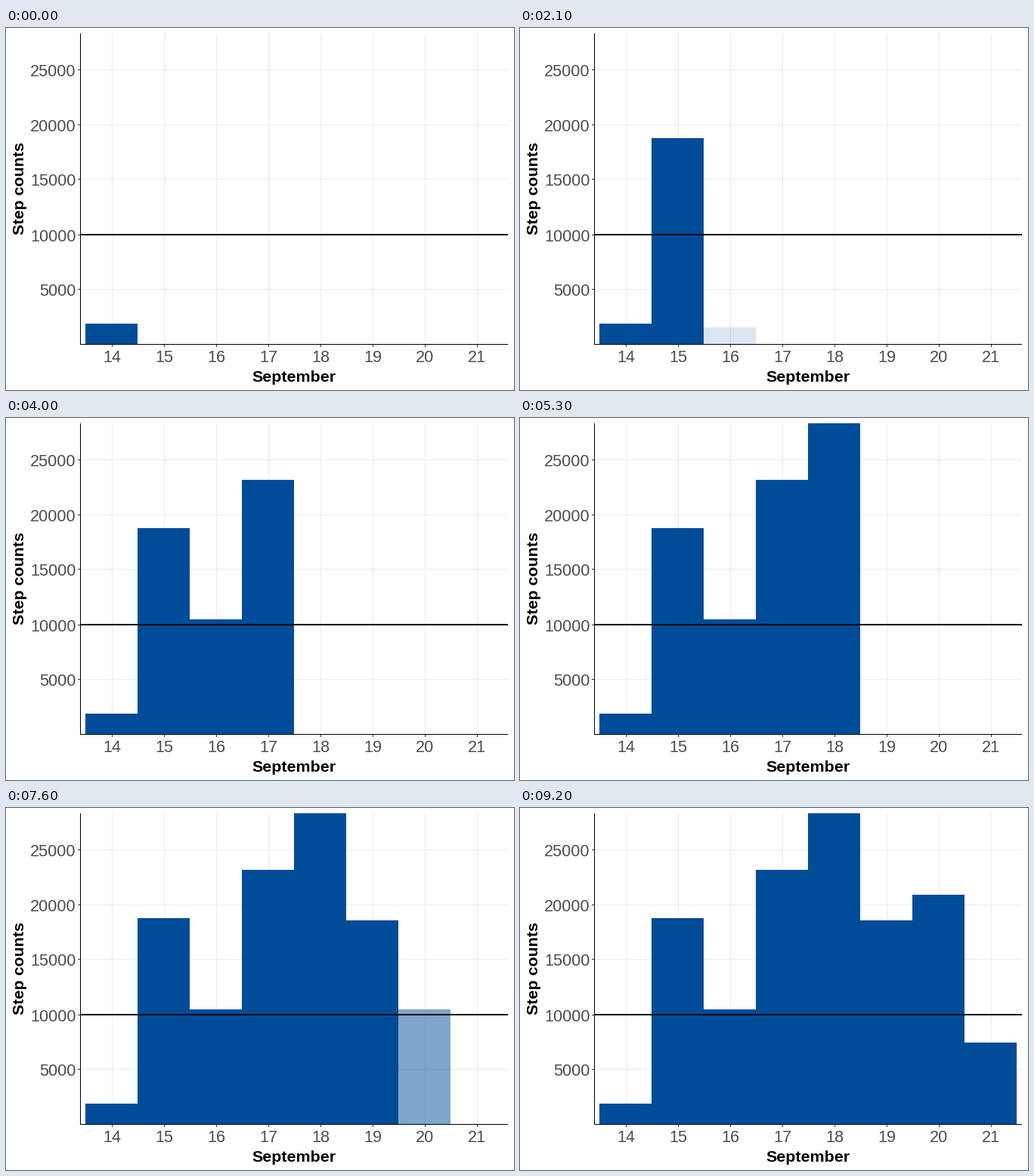
A matplotlib script for the animation above (10 s loop, 672 by 480 pixels).

```python
import matplotlib.pyplot as plt
from matplotlib.animation import FuncAnimation
from matplotlib.patches import Rectangle

W, H, DPI = 672, 480, 96
LEFT, RIGHT, TOP, BASE = 98, 664, 7, 419
BAR_X, BAR_W = 105, 69
BLUE, GRID, TICK, LABEL = "#004c99", "#ebebeb", "#333333", "#4d4d4d"

# Per day: top of the full bar, first frame of its growth, growth steps
DAYS = [(392, 0, 1), (146, 7, 7), (267, 21, 7), (82, 35, 6),
        (7, 48, 6), (149, 61, 6), (115, 74, 6), (311, 87, 6)]

plt.rcParams["font.family"] = "Liberation Sans"
fig = plt.figure(figsize=(W / DPI, H / DPI), dpi=DPI, facecolor="white")
ax = fig.add_axes([0, 0, 1, 1])
ax.set(xlim=(0, W), ylim=(H, 0))
ax.axis("off")


def box(x, y, w, h, color, z):
    return ax.add_patch(Rectangle((x, y), w, h, facecolor=color, lw=0,
                                  antialiased=False, zorder=z))


def label(x, y, text, ha="center", **style):
    ax.text(x, y, text, ha=ha, va="baseline", zorder=6, **style)


# Grid, ticks and tick labels
for i in range(len(DAYS)):
    x = BAR_X + 35 + i * BAR_W
    box(x, TOP, 1, BASE - TOP, GRID, 1)
    box(x, BASE + 1, 1, 3, TICK, 5)
    label(x + 0.3, 443, str(14 + i), color=LABEL, fontsize=16.2)

for steps in range(5000, 25001, 5000):
    y = int(419.4 - steps * 72.8 / 5000)
    y += steps == 10000
    box(LEFT, y, RIGHT - LEFT, 1, GRID, 1)
    box(LEFT - 3, y, 3, 1, TICK, 5)
    label(92.5, y + 9, str(steps), ha="right", color=LABEL, fontsize=16.2)

# Goal line and axes
box(LEFT, 273, RIGHT - LEFT, 2, "black", 4)
box(LEFT, TOP, 1, BASE + 1 - TOP, "black", 5)
box(LEFT, BASE, RIGHT - LEFT, 1, "black", 5)

title = dict(color="black", fontsize=16, fontweight="bold")
label(381.3, 469, "September", **title)
ax.text(24, 212.5, "Step counts", rotation=90, ha="right", va="center",
        rotation_mode="default", alpha=0, **title)
ax.text(24, 212.5, "Step counts", rotation=90, ha="center", va="baseline",
        rotation_mode="anchor", zorder=6, **title)

bars = [box(BAR_X + i * BAR_W, BASE, BAR_W, 0, BLUE, 3)
        for i in range(len(DAYS))]


def update(frame):
    for bar, (top, start, steps) in zip(bars, DAYS):
        p = min(max((frame - start + 1) / steps, 0), 1)
        height = round((BASE - top) * p)
        bar.set_y(BASE - height)
        bar.set_height(height)
        bar.set_alpha(p)
    return bars


anim = FuncAnimation(fig, update, frames=100, interval=100,
                     repeat=True, repeat_delay=0, blit=False)
plt.show()
```
